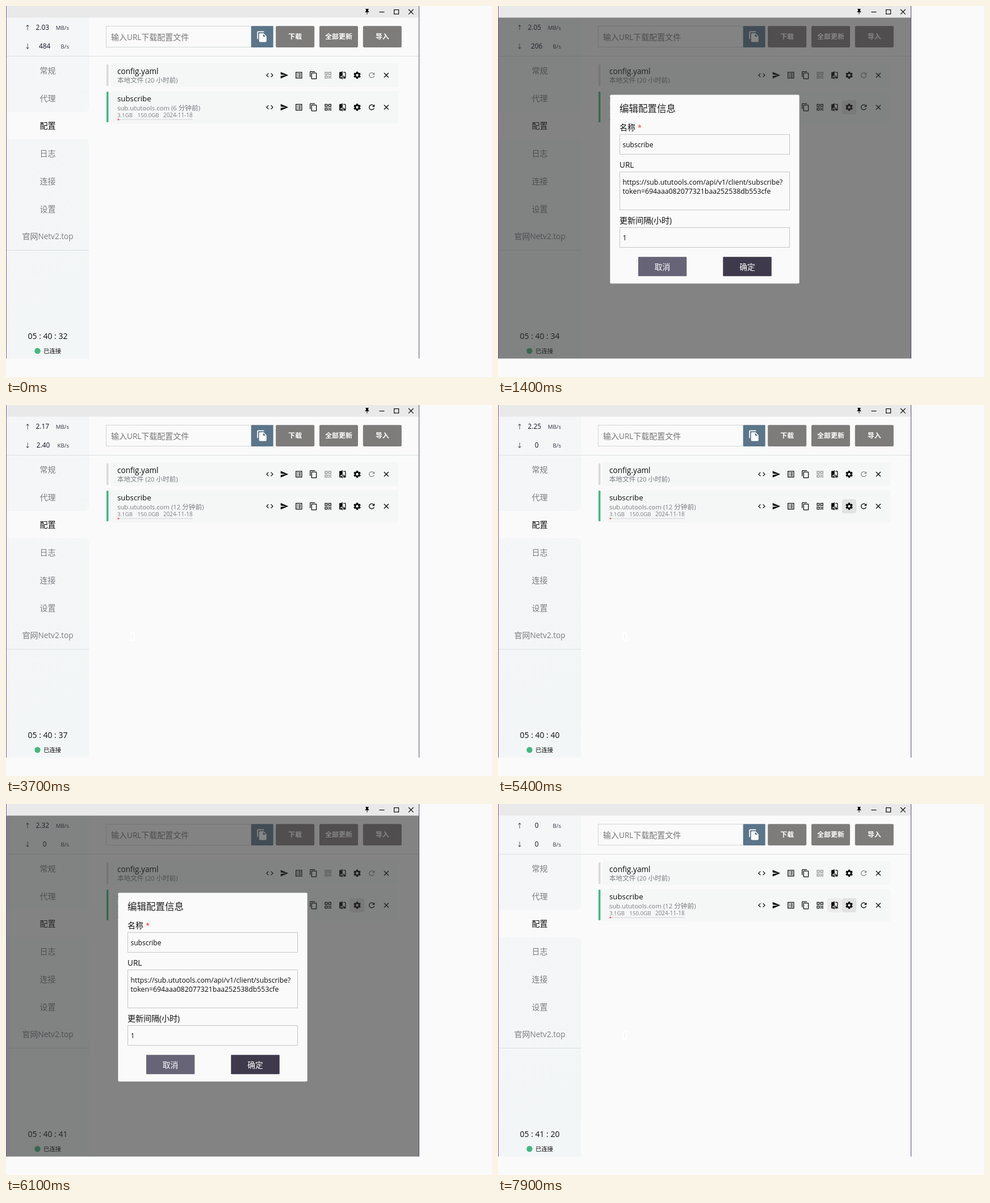
Recreate the animation shown at these times as an HTML page with a canvas. Size 856 px wide and 654 px high, loop 8 s.

```html
<!DOCTYPE html>
<html lang="zh-CN">
<head>
<meta charset="utf-8">
<style>
  html, body { margin: 0; width: 100%; height: 100%; overflow: hidden; background: #fafafa; }
  canvas { display: block; }
</style>
</head>
<body>
<canvas id="stage" width="856" height="654"></canvas>
<script>
const ctx = document.getElementById('stage').getContext('2d');
const LOOP = 8000;
const FONT = '"Open Sans", "Noto Sans", "Noto Sans CJK SC", "Noto Sans CJK", "DejaVu Sans", sans-serif';
const INK = '#0c0c0c', GREY = '#7b7d80', PAGE = '#fafafa', GREEN = '#42b883';

// start time, clock, upload, download
const STATS = [
  [0, '05 : 40 : 32', '2.03 MB/s', '484 B/s'],
  [400, '05 : 40 : 33', '1.98 MB/s', '351 B/s'],
  [1100, '05 : 40 : 34', '2.05 MB/s', '206 B/s'],
  [1900, '05 : 40 : 35', '2.11 MB/s', '248 B/s'],
  [2300, '05 : 40 : 36', '2.14 MB/s', '372 B/s'],
  [3200, '05 : 40 : 37', '2.17 MB/s', '2.40 KB/s'],
  [3900, '05 : 40 : 38', '1.97 MB/s', '124 B/s'],
  [4700, '05 : 40 : 39', '2.21 MB/s', '0 B/s'],
  [5400, '05 : 40 : 40', '2.25 MB/s', '0 B/s'],
  [6100, '05 : 40 : 41', '2.32 MB/s', '0 B/s'],
  [6800, '05 : 40 : 42', '1.86 MB/s', '0 B/s'],
  [7100, '05 : 41 : 19', '1.20 KB/s', '0 B/s'],
  [7600, '05 : 41 : 20', '0 B/s', '0 B/s'],
];

// icon outlines on a 24 unit grid
const ICONS = {
  code: 'M9.4 16.6 4.8 12l4.6-4.6L8 6l-6 6 6 6zm5.2 0 4.6-4.6-4.6-4.6L16 6l6 6-6 6z',
  send: 'M2 21 23 12 2 3v7l15 2-15 2z',
  list: 'M3 3h18v18H3zM5 5v14h14V5zM11 7h6v2h-6zm0 4h6v2h-6zm0 4h6v2h-6zM7 7h2v2H7zm0 4h2v2H7zm0 4h2v2H7z',
  copy: 'M16 1H4c-1.1 0-2 .9-2 2v14h2V3h12zm3 4H8c-1.1 0-2 .9-2 2v14c0 1.1.9 2 2 2h11c1.1 0 2-.9 2-2V7c0-1.1-.9-2-2-2zm0 16H8V7h11z',
  grid: 'M3 3h8v8H3zM5 5v4h4V5zM3 13h8v8H3zM5 15v4h4v-4zM13 3h8v8h-8zM15 5v4h4V5zM13 13h3v3h-3zM18 13h3v3h-3zM16 16h2v2h-2zM13 18h3v3h-3zM18 18h3v3h-3z',
  compare: 'M10 3H5c-1.1 0-2 .9-2 2v14c0 1.1.9 2 2 2h5v2h2V1h-2zm0 15H5l5-6zm9-15h-5v2h5v13l-5-6v9h5c1.1 0 2-.9 2-2V5c0-1.1-.9-2-2-2z',
  gear: gearPath(),
  refresh: 'M17.65 6.35C16.2 4.9 14.21 4 12 4c-4.42 0-8 3.58-8 8s3.58 8 8 8c3.73 0 6.84-2.55 7.73-6h-2.08c-.82 2.33-3.04 4-5.65 4-3.31 0-6-2.69-6-6s2.69-6 6-6c1.66 0 3.14.69 4.22 1.78L13 11h7V4z',
  close: 'M19 6.41 17.59 5 12 10.59 6.41 5 5 6.41 10.59 12 5 17.59 6.41 19 12 13.41 17.59 19 19 17.59 13.41 12z',
  paste: 'M16 1H4c-1.1 0-2 .9-2 2v14h2V3h12zm-1 4 6 6v10c0 1.1-.9 2-2 2H8c-1.1 0-2-.9-2-2V7c0-1.1.9-2 2-2zm-1 7h5.5L14 6.5z',
  pin: 'M16 9V4h1c1.3 0 1.3-2 0-2H7c-1.3 0-1.3 2 0 2h1v5c0 1.66-1.34 3-3 3v2h6v7l1 1 1-1v-7h6v-2c-1.66 0-3-1.34-3-3z',
};
const TOOLS = ['code', 'send', 'list', 'copy', 'grid', 'compare', 'gear', 'refresh', 'close'];
for (const name in ICONS) ICONS[name] = new Path2D(ICONS[name]);

function gearPath() {
  const points = [];
  for (let i = 0; i < 24; i++) {
    const r = i % 4 < 2 ? 10.2 : 7.7;
    const a = (Math.floor(i / 4) * 60 + [-14, 14, 20, 40][i % 4] + 30) * Math.PI / 180;
    points.push((12 + r * Math.cos(a)).toFixed(2) + ' ' + (12 + r * Math.sin(a)).toFixed(2));
  }
  return 'M' + points.join('L') + 'zM8.5 12a3.5 3.5 0 1 0 7 0a3.5 3.5 0 1 0-7 0z';
}

function rect(x, y, w, h, color, radius = 0) {
  ctx.fillStyle = color;
  ctx.beginPath();
  ctx.roundRect(x, y, w, h, radius);
  ctx.fill();
}

function frame(x, y, w, h, color) {
  ctx.strokeStyle = color;
  ctx.lineWidth = 1;
  ctx.strokeRect(x + .5, y + .5, w - 1, h - 1);
}

function dot(x, y, r, color) {
  ctx.fillStyle = color;
  ctx.beginPath();
  ctx.arc(x, y, r, 0, 7);
  ctx.fill();
}

function icon(name, x, y, scale, color) {
  ctx.save();
  ctx.translate(x - 12 * scale, y - 12 * scale);
  ctx.scale(scale, scale);
  ctx.fillStyle = color;
  ctx.fill(ICONS[name], 'evenodd');
  ctx.restore();
}

// Latin runs are set slightly smaller than Chinese ones
function text(str, x, y, size, color, align = 0, weight = 400) {
  const runs = str.match(/[\u4e00-\u9fff]+|[^\u4e00-\u9fff]+/g);
  const setFont = run => {
    const px = /[\u4e00-\u9fff]/.test(run) ? size : size * .97;
    ctx.font = `${weight} ${px}px ${FONT}`;
  };
  const widths = runs.map(run => { setFont(run); return ctx.measureText(run).width; });
  x -= align * widths.reduce((a, b) => a + b, 0);
  ctx.fillStyle = color;
  runs.forEach((run, i) => {
    setFont(run);
    ctx.fillText(run, x, y);
    x += widths[i];
  });
}

function speed(arrow, value, y) {
  const [num, unit] = value.split(' ');
  const mid = { 'MB/s': 64.3, 'KB/s': 65.5, 'B/s': 68.2 }[unit];
  text(arrow, 38, y, 11, '#222', .5);
  text(num, mid, y, 12.2, '#101022', .5);
  text(unit, 111, y, 10, '#303040', 1);
}

function sidebar(stat) {
  const fill = ctx.createLinearGradient(0, 20, 146, 622);
  fill.addColorStop(0, '#f5f6f7');
  fill.addColorStop(1, '#f3f6f6');
  rect(1, 20, 145, 167, fill, [0, 0, 8, 0]);
  rect(1, 235, 145, 386.5, fill, [0, 8, 0, 0]);
  speed('↑', stat[2], 42);
  speed('↓', stat[3], 75);
  ['常规', '代理', '配置', '日志', '连接', '设置', '官网Netv2.top'].forEach((label, i) =>
    text(label, 73.5, 119 + i * 48.7, 14, i === 2 ? INK : GREY, .5));
  rect(1, 88, 726, 1, '#dcdfe0');
  rect(1, 430, 145, 1, '#dcdfe0');
  text(stat[1], 73.5, 587, 14.4, INK, .5);
  dot(55.5, 608, 5.2, GREEN);
  text('已连接', 66, 612, 10.4, INK);
}

function toolbar() {
  frame(176, 35, 256, 38, '#d3d5d6');
  text('输入URL下载配置文件', 185, 60, 14, '#757575');
  rect(432, 35.3, 38.7, 37.7, '#5b7589', 1);
  icon('paste', 451, 54, .87, '#fff');
  ['下载', '全部更新', '导入'].forEach((label, i) => {
    const x = 475.2 + i * 76.8;
    rect(x, 35.3, 68, 37.7, '#7e7b7b', 2);
    text(label, x + 34, 58.3, 11.9, '#fff', .5, 600);
  });
}

const toolX = i => 464.5 + i * 25.67;

function tools(y, disabled) {
  TOOLS.forEach((name, i) => icon(name, toolX(i), y, .64,
    disabled.includes(name) ? '#8e8e8e' : INK));
}

function hover(name, color) {
  rect(toolX(TOOLS.indexOf(name)) - 12.8, 166, 25.5, 25, color, 4);
}

function rows(t) {
  rect(184, 101, 507, 41.5, '#f5f6f6', 4);
  rect(177, 103, 3.5, 38, '#dadada', 1);
  text('config.yaml', 196, 120, 14, INK);
  text('本地文件 (20 小时前)', 196, 135, 11.6, GREY);
  tools(122, ['grid', 'refresh']);

  rect(184, 150, 507, 57, '#f5f6f6', 4);
  rect(177, 151, 3.5, 54, GREEN, 1);
  text('subscribe', 196, 168, 13.7, INK);
  text(`sub.ututools.com (${t < 1300 ? 6 : 12} 分钟前)`, 196, 184, 11.7, GREY);
  text('3.1GB', 196, 196.4, 10, GREY);
  text('150.0GB', 231.5, 196.4, 10, GREY);
  text('2024-11-18', 277, 196.4, 10.2, GREY);
  rect(196, 199.3, 133, 1.8, '#dfe2e5', 1);
  rect(196.5, 198.7, 3, 2.8, '#f0616b', 1);

  if (t >= 800 && t < 1100) hover('refresh', '#e2e3e3');
  if (t >= 1100 && t < 1900 || t >= 5400 && t < 6400 || t >= 7900) hover('gear', '#e2e2e2');
  if (t >= 7600) hover('compare', t < 7700 ? '#f0f1f1' : '#ececec');
  tools(178.5, []);
}

function titleBar() {
  rect(0, 0, 728, 20.5, '#e9e9e9');
  icon('pin', 636, 10, .5, INK);
  rect(657.5, 10, 9, 1.2, INK);
  ctx.strokeStyle = INK;
  ctx.lineWidth = 1.2;
  ctx.strokeRect(683.6, 6.6, 8, 7.6);
  ctx.beginPath();
  for (const d of [-1, 1]) {
    ctx.moveTo(709, 10.3 - 4.3 * d);
    ctx.lineTo(717.6, 10.3 + 4.3 * d);
  }
  ctx.stroke();
}

function interval(t) {
  const selected = t >= 2400 && t < 2800;
  if (selected) rect(219, 399, 8, 17, '#0078d7');
  if (t >= 2800 && t < 3200) rect(219.5, 400, 1, 15, INK);
  else text('1', 219.5, 412.5, 12.6, selected ? '#fff' : INK);
}

function dialog(t) {
  rect(197.4, 156.6, 333.3, 332.7, PAGE, 2);
  text('编辑配置信息', 214, 187.4, 16.5, '#202020');
  text('名称', 214, 218.5, 14, INK);
  text('*', 246, 218.5, 13, '#f03030');
  text('URL', 214, 284.5, 14, INK);
  text('更新间隔(小时)', 214, 382.5, 14, INK);
  frame(214, 226, 300, 36, '#c6c6c6');
  frame(214, 292, 300, 68, '#c6c6c6');
  frame(214, 390, 300, 36, '#c6c6c6');
  text('subscribe', 219.5, 248.5, 12.4, INK);
  text('https://sub.ututools.com/api/v1/client/subscribe?', 219.5, 314.5, 12.7, INK);
  text('token=694aaa082077321baa252538db553cfe', 219.5, 330.5, 12.7, INK);
  if (t >= 3200) rect(219, 400, 8.5, 16, '#fff');
  interval(t);
  rect(247, 442.3, 85.3, 34, '#676478', 1);
  rect(396.3, 442.3, 85.5, 34, '#3e3a4c', 1);
  text('取消', 289.5, 464.8, 13.8, '#fff', .5, 500);
  text('确定', 439, 464.8, 13.8, '#fff', .5, 500);
}

function draw(t) {
  const stat = STATS.findLast(s => s[0] <= t);
  const open = t >= 1300 && t < 3700 || t >= 5700 && t < 6400;
  rect(0, 0, 856, 654, PAGE);
  sidebar(stat);
  toolbar();
  rows(t);
  if (open) {
    ctx.globalAlpha = t < 1400 ? .5 : 1;
    rect(1, 20, 726, 601.5, 'rgba(48,48,48,.58)');
    dialog(t);
    ctx.globalAlpha = 1;
  } else if (t >= 3700) {
    rect(219.5, 400, 7.5, 16, '#fff');
    rect(222, 403, 2, 10, '#f5f5f5');
  }
  titleBar();
  rect(0, 0, 1, 621.5, '#8259a0');
  rect(727, 0, 1, 621.5, '#5c4e6c');
}

function tick() {
  draw(performance.now() % LOOP);
  requestAnimationFrame(tick);
}
tick();
</script>
</body>
</html>
```
